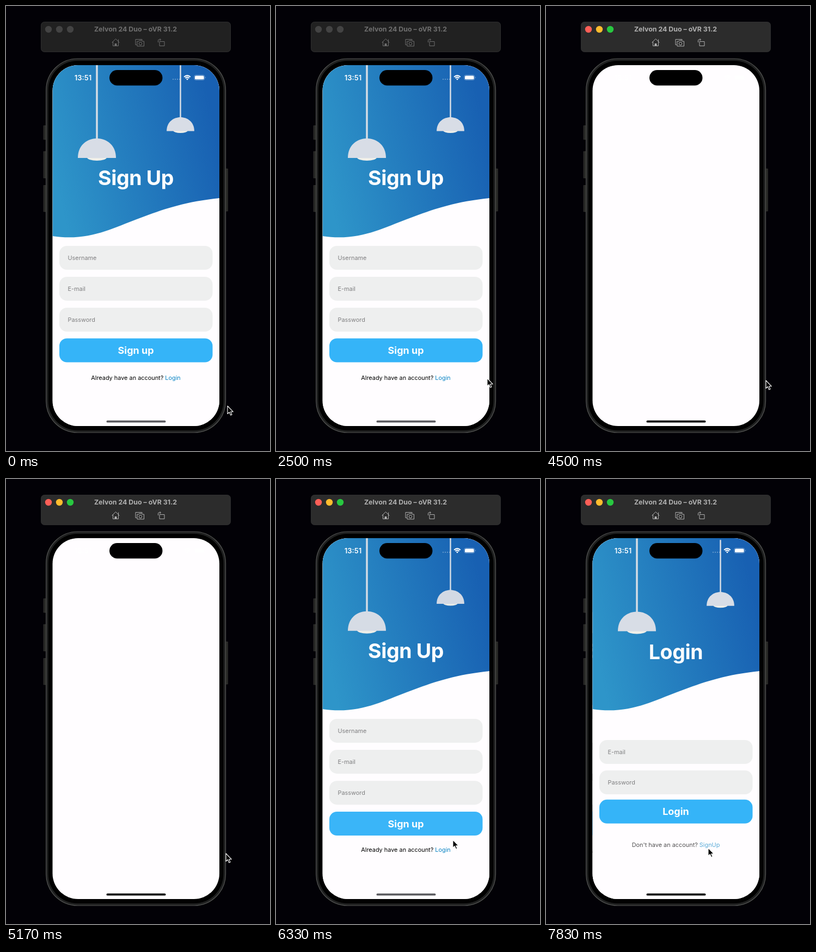
Recreate the animation shown at these times as an HTML page. Size 485x820 px, loop 8 s.

```html
<!DOCTYPE html>
<html lang="en">
<head>
<meta charset="utf-8">
<title>Sign-up flow</title>
<style>
html, body { margin: 0; height: 100%; overflow: hidden; background: #020106; }
svg { display: block; width: 100vw; height: 100vh; font-family: Inter, sans-serif; }
.mid { text-anchor: middle; }
.bold { font-weight: 700; fill: #fff; }
.small { font-size: 10.9px; }
#bar { --line: #6f6f6f; --face: #212121; }
#bar.active { --line: #b0b0b0; --face: #2c2c2c; }
#bar circle { fill: #434343; }
#bar.active circle { fill: var(--on); }
#bar .icon { fill: none; stroke: var(--line); stroke-width: 1; stroke-linejoin: round; }
</style>
</head>
<body>
<svg viewBox="0 0 485 820">
  <defs>
    <linearGradient id="sky" gradientUnits="userSpaceOnUse" x1="90" y1="320" x2="392" y2="250">
      <stop offset="0" stop-color="#2e95c9"/><stop offset="1" stop-color="#1860b2"/>
    </linearGradient>
    <clipPath id="glass"><rect x="85.5" y="109" width="306.5" height="665" rx="47"/></clipPath>
    <g id="lamp">
      <path d="M0-135V1" stroke="#d5dce5" stroke-width="3.5"/>
      <ellipse cy="35" rx="18" ry="6" fill="#efefe9"/>
      <path d="M-35 36C-35-12 35-12 35 36Z" fill="#d8dde6"/>
    </g>
  </defs>

  <g id="bar">
    <rect x="64.5" y="29.5" width="348" height="55" rx="6" fill="var(--face)" stroke="#363636" stroke-width=".8"/>
    <circle cx="78" cy="43" r="6.2" style="--on:#ff5f57"/>
    <circle cx="98" cy="43" r="6.2" style="--on:#febc2e"/>
    <circle cx="118" cy="43" r="6.2" style="--on:#28c840"/>
    <text class="mid" x="238" y="47" font-size="12.4" font-weight="700" fill="var(--line)">Zelvon 24 Duo – oVR 31.2</text>
    <g class="icon">
      <path d="M194.5 67.5L201.5 60.5L208.500 67.5M196.500 66V73.500H206.500V66M206.500 65V61.500"/>
      <path d="M200 73.500V69.500H203V73.500Z" fill="var(--line)"/>
      <path d="M240 71.500H238V61.500H250V63.500M241 65H244L245 63.500H249L250 65H253.500V74H241Z"/>
      <circle cx="247" cy="69.300" r="2.700" style="fill:none"/>
      <path d="M282 65.500H291V73.500H282ZM279.500 67V63.500Q279.500 62 281 62H284M282.500 60L284.500 62L282.500 64"/>
    </g>
  </g>

  <g fill="#262724" stroke="#393a37" stroke-width=".6">
    <path d="M69 220.500H74V246H69ZM69 268H74V317H69ZM69 330.500H74V379H69ZM403 300H407.500V378H403Z"/>
  </g>
  <rect x="73.700" y="97" width="329.800" height="689" rx="58" fill="#1f2020" stroke="#545553" stroke-width="1.200"/>
  <rect x="77.700" y="101" width="321.800" height="681" rx="54" fill="#000"/>

  <g clip-path="url(#glass)">
    <rect x="85" y="108" width="308" height="667" fill="#fffdff"/>
    <g id="signup"></g>
    <g id="login"></g>
    <g fill="#fff">
      <text class="mid" x="141.500" y="136.500" font-size="13" font-weight="600">13:51</text>
      <path d="M306 135H320" stroke="#fff" stroke-width="2" stroke-dasharray="2 2" opacity=".3"/>
      <g fill="none" stroke="#fff" stroke-width="2">
        <path d="M327.200 130.800Q333 125.400 338.800 130.800M329.400 133Q333 129.800 336.600 133"/>
      </g>
      <path d="M331 134.600Q333 133 335 134.600L333 136.800Z"/>
      <rect x="345.800" y="127.300" width="19" height="9.200" rx="3" fill="none" stroke="#fff" stroke-opacity=".45" stroke-width=".8"/>
      <rect x="347" y="128.500" width="16.600" height="6.800" rx="1.900"/>
      <path d="M366 130.300Q367.600 131.900 366 133.500Z" opacity=".5"/>
    </g>
    <rect x="190" y="118" width="97.500" height="28.500" rx="14.250"/>
    <rect id="home" x="184.500" y="763.800" width="109" height="3.800" rx="1.900"/>
  </g>

  <path id="cursor" d="M0 0V14.500L3.300 11.500L5.700 17L8 16L5.700 10.700H10.200Z" stroke="#fff" stroke-width="1.100" stroke-linejoin="round"/>
</svg>

<script>
const LOOP = 8000, FPS = 6, WIDTH = 306.5, DROP = 19.5;
const FOCUS = 3330, RELOAD = 4100, SIGNUP_IN = 5232, LOGIN_IN = 7070, PUSH = 7065;
const CURSOR = [[0, 407, 737], [160, 388, 686], [2500, 388, 686], [2660, 392, 687], [2840, 392, 687],
  [3160, 404, 690], [5800, 404, 690], [6333, 325, 665], [6500, 298, 680], [LOOP, 298, 680]];

const $ = id => document.getElementById(id);
const clamp = v => Math.min(1, Math.max(0, v));

// An entering part: dir -1 drops in from above, +1 rises from below.
const enter = (delay, dir, body) => `<g class="enter" data-delay="${delay}" data-dir="${dir}">${body}</g>`;
const box = (y, fill) => `<rect x="98" y="${y - 22}" width="281.5" height="44" rx="14" fill="${fill}"/>`;
const field = (y, label) => box(y, '#eeefef') + `<text class="small" x="113.5" y="${y + 4}" fill="#7f7f80">${label}</text>`;
const button = (y, label) => box(y, '#35b4f8') + `<text class="mid bold" x="238.5" y="${y + 6.5}" font-size="18">${label}</text>`;
const prompt = (y, ask, link) => `<text class="mid small" x="238.500" y="${y + 4}">${ask} <tspan class="link" fill="#0a84c4">${link}</tspan></text>`;

function page({ title, titleY, rows, delays }) {
  return `<rect x="85.500" y="108" width="${WIDTH}" height="667" fill="#fffdff"/>
    <path d="M85.500 108V424C150 434 195 410 240 393S325 361 392 354V108Z" fill="url(#sky)"/>` +
    enter(200, -1, '<use href="#lamp" x="167" y="244"/>') +
    enter(400, -1, '<use href="#lamp" transform="translate(320.5 205) scale(.725 .71)"/>') +
    enter(0, -1, `<text class="mid bold" x="238.500" y="${titleY}" font-size="37.500" letter-spacing="-.4">${title}</text>`) +
    rows.map((row, i) => enter(delays[i], 1, row)).join('') +
    '<rect class="dim" x="85.500" y="108" width="307" height="667" opacity="0"/>';
}

$('signup').innerHTML = page({
  title: 'Sign Up', titleY: 330, delays: [0, 0, 200, 400, 600],
  rows: [field(464, 'Username'), field(521, 'E-mail'), field(578, 'Password'),
    button(634.5, 'Sign up'), prompt(684.7, 'Already have an account?', 'Login')]
});
$('login').innerHTML = page({
  title: 'Login', titleY: 332.5, delays: [0, 200, 400, 600],
  rows: [field(502.5, 'E-mail'), field(559.5, 'Password'),
    button(616, 'Login'), prompt(667.5, "Don't have an account?", 'SignUp')]
});

// Damped spring: stiffness 100, damping 10, mass 1.
function spring(ms) {
  if (ms <= 0) return 0;
  const s = ms / 1000, w = Math.sqrt(75);
  return 1 - Math.exp(-5 * s) * (Math.cos(w * s) + 5 / w * Math.sin(w * s));
}

function animate(screen, age) {
  for (const part of screen.querySelectorAll('.enter')) {
    const p = spring(age - part.dataset.delay);
    part.setAttribute('transform', `translate(0 ${DROP * part.dataset.dir * (1 - p)})`);
    part.setAttribute('opacity', clamp(p));
  }
}

function cursorAt(t) {
  const i = Math.max(1, CURSOR.findIndex(k => k[0] >= t));
  const [t0, x0, y0] = CURSOR[i - 1], [t1, x1, y1] = CURSOR[i];
  const u = clamp((t - t0) / (t1 - t0));
  return [x0 + (x1 - x0) * u, y0 + (y1 - y0) * u];
}

function draw(t) {
  const loading = t >= RELOAD && t < SIGNUP_IN;
  const push = 1 - (1 - clamp((t - PUSH) / 500)) ** 2;
  const signup = $('signup'), login = $('login');

  $('bar').classList.toggle('active', t >= FOCUS);
  signup.style.display = loading ? 'none' : '';
  animate(signup, t < RELOAD ? 1e4 : t - SIGNUP_IN);
  signup.setAttribute('transform', `translate(${-0.3 * WIDTH * push} 0)`);
  signup.querySelector('.dim').setAttribute('opacity', 0.12 * push);
  const pressed = t >= 6830 ? 0.2 + 0.8 * clamp((t - 7060) / 340) : 1;
  signup.querySelector('.link').setAttribute('fill-opacity', pressed);

  login.style.display = t >= PUSH ? '' : 'none';
  animate(login, t - LOGIN_IN);
  login.setAttribute('transform', `translate(${WIDTH * (1 - push)} 0)`);

  $('home').setAttribute('fill', loading || t >= PUSH ? '#000' : '#5c5b60');
  $('cursor').setAttribute('transform', `translate(${cursorAt(t)})`);
}

function tick() {
  const t = (performance.now() + 4) % LOOP;
  draw(Math.floor(t * FPS / 1000) * 1000 / FPS);
  requestAnimationFrame(tick);
}
tick();
</script>
</body>
</html>
```
